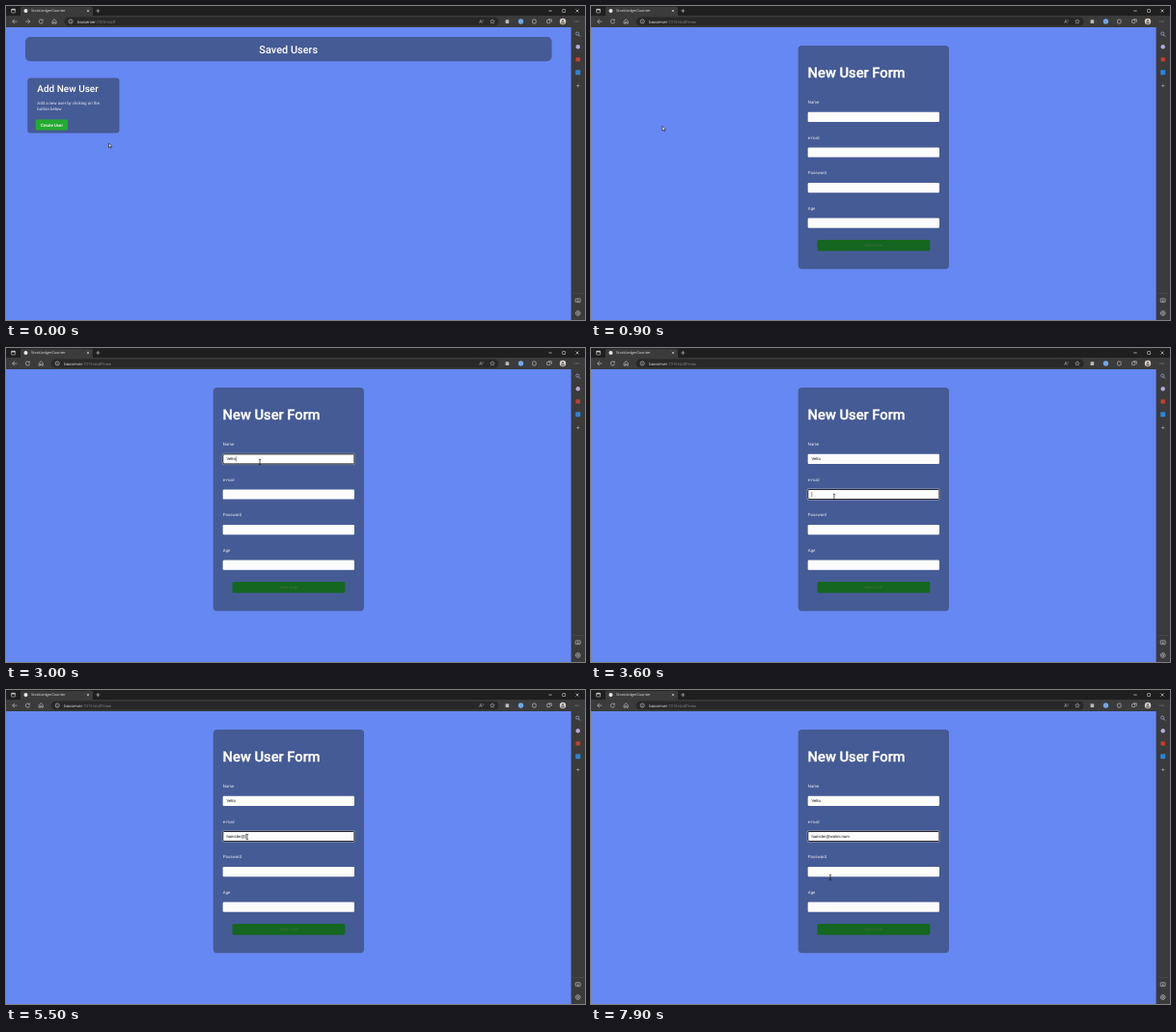
An HTML page with a canvas that plays this animation: 600x325 px, repeating every 8 s.

```html
<!DOCTYPE html>
<html lang="en">
<head>
<meta charset="utf-8">
<title>User form</title>
<style>
html, body { margin: 0; width: 100%; height: 100%; overflow: hidden; background: #6688f2; }
canvas { display: block; width: 600px; height: 325px; }
</style>
</head>
<body>
<canvas id="stage"></canvas>
<script>
const LOOP = 8000, STEP = 100;
const canvas = document.getElementById('stage');
const ctx = canvas.getContext('2d');
const dpr = window.devicePixelRatio || 1;
canvas.width = 600 * dpr;
canvas.height = 325 * dpr;

const ROBOTO = 'Roboto, sans-serif';
const ARIAL = '"Liberation Sans", Arial, sans-serif';
const CHROME = '"Open Sans", sans-serif';
const BAR = '#3b3b3b', PAGE = '#6688f2', CARD = '#455b95', ICON = '#cfcfcf';

// time, x, y
const path = [
  [0, 106.5, 142], [300, 62, 127], [500, 49, 123.5], [800, 49, 123.5], [900, 74, 124.5],
  [1200, 196, 122], [1500, 263, 118], [3200, 263, 118], [3600, 252, 154],
  [3700, 252, 154], [3900, 250, 152], [7500, 250, 152], [7900, 248, 194]
];
const NAME = 'Velto', MAIL = 'hamster@wolmi.nom';
const nameKeys = [2300, 2500, 2600, 2800, 2900];
const mailKeys = [3900, 4100, 4300, 4600, 4800, 5000, 5100, 5400, 5700,
  5800, 6000, 6100, 6300, 6600, 6700, 6800, 7000];
const labels = ['Name', 'e-mail', 'Password', 'Age'];
const fieldY = i => 109.8 + i * 36.6;

function typed(text, keys, t) {
  return text.slice(0, keys.filter(k => k <= t).length);
}

function pointerAt(t) {
  const i = path.findIndex(p => p[0] > t);
  if (i < 0) return path[path.length - 1].slice(1);
  const [t0, x0, y0] = path[i - 1], [t1, x1, y1] = path[i];
  const k = (t - t0) / (t1 - t0);
  return [x0 + (x1 - x0) * k, y0 + (y1 - y0) * k];
}

function rect(x, y, w, h, color) {
  ctx.fillStyle = color;
  ctx.fillRect(x, y, w, h);
}

function round(x, y, w, h, r, color) {
  ctx.beginPath();
  ctx.roundRect(x, y, w, h, r);
  ctx.fillStyle = color;
  ctx.fill();
}

function disc(x, y, r, color) {
  ctx.beginPath();
  ctx.arc(x, y, r, 0, 7);
  ctx.fillStyle = color;
  ctx.fill();
}

function ring(x, y, r, color = ICON, from = 0, to = 2 * Math.PI) {
  ctx.beginPath();
  ctx.arc(x, y, r, from, to);
  ctx.strokeStyle = color;
  ctx.lineWidth = 0.6;
  ctx.stroke();
}

function box(x, y, w, h, r = 0.5) {
  ctx.beginPath();
  ctx.roundRect(x, y, w, h, r);
  ctx.strokeStyle = ICON;
  ctx.lineWidth = 0.6;
  ctx.stroke();
}

function draw(d, x, y, color = ICON, width = 0.6) {
  ctx.save();
  ctx.translate(x, y);
  ctx.strokeStyle = color;
  ctx.lineWidth = width;
  ctx.stroke(new Path2D(d));
  ctx.restore();
}

function text(s, x, y, font, color, align = 'left') {
  ctx.font = font;
  ctx.textAlign = align;
  ctx.fillStyle = color;
  ctx.fillText(s, x, y);
  return ctx.measureText(s).width;
}

function tabStrip() {
  rect(0, 0, 600, 11, '#1f1f1f');
  round(15, 0.8, 75, 12, 1.5, BAR);
  box(5.6, 3.2, 4, 3.8);
  rect(5.6, 3.2, 4, 1.2, '#e0e0e0');
  disc(20.5, 5, 2, '#e8e8e8');
  text('StockLedgerCounter', 26, 6.4, '3.75px ' + CHROME, '#e6e6e6');
  draw('M-1.2-1.2L1.2 1.2M1.2-1.2L-1.2 1.2', 85, 5, '#dddddd');
  draw('M-2 0H2M0-2V2', 95.3, 5);
  draw('M-1.7 0H1.7', 564, 5, '#eeeeee');
  box(576.6, 3.5, 3, 3, 0.3);
  draw('M-1.5-1.5L1.5 1.5M1.5-1.5L-1.5 1.5', 592, 5, '#eeeeee');
}

function toolbar(form) {
  const shift = form ? -13.8 : 0;
  rect(0, 10, 600, 12, BAR);
  draw('M2.4 0H-2.3M0-2.2L-2.3 0L0 2.2', 9, 16);
  if (!form) draw('M-2.4 0H2.3M0-2.2L2.3 0L0 2.2', 22.5, 16);
  ring(36.3 + shift, 16, 2.1, ICON, 0.2, 5.3);
  draw('M1.9-2.4V-.9H.4', 36.3 + shift, 16);
  draw('M-2.1 2.2V-.4L0-2.3L2.1-.4V2.2H.7V.6H-.7V2.2Z', 50 + shift, 16);

  round(60.5 + shift, 11.6, 450 - shift, 8.9, 4.4, '#282828');
  ring(67 + shift, 16, 2.1);
  draw('M0-.3V1.2M0-1.2V-.8', 67 + shift, 16);
  const font = '4.1px ' + CHROME, x = 74 + shift;
  const w = text('boxserver', x, 17.5, font, '#f2f2f2');
  text(':7315/staff' + (form ? '/new' : ''), x + w, 17.5, font, '#8d8d8d');

  draw('M-2 1.8L-.6-1.8L.8 1.8M-1.5.6H.3M1.4-1.8Q2.4-.8 1.6.4', 492.5, 16, '#a8a8a8', 0.5);
  draw('M0-2.3L.7-.7L2.3-.6L1 .5L1.4 2.1L0 1.2L-1.4 2.1L-1 .5L-2.3-.6L-.7-.7Z', 504, 16, '#b5b5b5', 0.5);
  round(517.6, 14.3, 3.6, 3.6, 0.5, '#b9b9b9');
  disc(533.5, 16, 2.7, '#6fa8e8');
  box(545.6, 14, 3.6, 4, 1);
  box(560.6, 14.4, 3.2, 3.2);
  draw('M-.8-2.2H2.3V.8', 563, 16);
  disc(577, 16, 3.2, '#d5d0cb');
  disc(577, 15.2, 1.1, '#77706b');
  round(575.1, 16.6, 3.8, 1.8, 0.9, '#77706b');
  for (let i = -1; i < 2; i++) disc(591.5 + i * 1.6, 16, 0.4, '#dddddd');
}

function sidebar() {
  rect(585.6, 22, 14.4, 303, BAR);
  ring(592.2, 28.6, 1.6, '#a9bdea');
  draw('M0 0L1.7 1.7', 593.3, 29.8, '#a9bdea', 0.8);
  disc(592.7, 42.3, 2.2, '#b9a8dc');
  round(590.5, 53.2, 4.4, 4.4, 0.4, '#c4402f');
  round(590.2, 66.2, 5, 5, 0.6, '#2b86d9');
  draw('M-1.8 0H1.8M0-1.8V1.8', 592.7, 82.5, '#aaaaaa');
  rect(588, 297, 10, 0.4, '#5a5a5a');
  box(590.2, 302.8, 5, 3.8);
  draw('M0-1.2V1.2M-1.2 0L0 1.2L1.2 0', 592.7, 304.7, ICON, 0.5);
  ring(592.7, 318, 1);
  draw('M-1.3-2.2H1.3L2.6 0L1.3 2.2H-1.3L-2.6 0Z', 592.7, 318);
}

function usersPage(t, [px, py]) {
  round(20, 32, 545.6, 25.3, 5, CARD);
  text('Saved Users', 292.7, 48.6, '500 10.94px ' + ROBOTO, '#ffffff', 'center');

  const onCard = px > 22 && px < 117.5 && py < 131;
  const onButton = px > 30 && px < 64 && py > 117 && py < 128.5;
  ctx.save();
  if (onCard) {
    ctx.shadowColor = 'rgba(20,30,70,.75)';
    ctx.shadowBlur = 4 * dpr;
  }
  round(22.3, 74.6, 95.2, 56.8, 3, CARD);
  ctx.restore();
  text('Add New User', 32.3, 89.1, '500 10px ' + ROBOTO, '#ffffff');
  const body = '4.375px ' + ROBOTO;
  text('Add a new user by clicking on the', 32.3, 101.6, body, '#e4e8f3');
  text('button below', 32.3, 107.9, body, '#e4e8f3');

  const grow = onButton ? 0.5 : 0;
  round(30.8 - grow, 117.4 - grow, 33.2 + grow * 2, 11.2 + grow * 2, 1.3,
    t >= 800 ? '#1e9a2a' : '#25ab30');
  text('Create User', 47.4, 124.5, '500 4.4px ' + ROBOTO, '#ffffff', 'center');
}

function field(i, value, focused, caret) {
  const x = 224.7, y = fieldY(i), w = 136.3, h = 10.2;
  text(labels[i], 224.8, y - 8.8, '4.375px ' + ROBOTO, '#e8ebf4');
  round(x, y, w, h, 1.2, '#fcfcfc');
  if (focused) {
    ctx.lineWidth = 0.5;
    ctx.strokeStyle = 'rgba(240,240,240,.7)';
    ctx.beginPath();
    ctx.roundRect(x - 0.6, y - 0.6, w + 1.2, h + 1.2, 1.6);
    ctx.stroke();
    ctx.lineWidth = 0.9;
    ctx.strokeStyle = '#181818';
    ctx.beginPath();
    ctx.roundRect(x + 0.1, y + 0.1, w - 0.2, h - 0.2, 1.2);
    ctx.stroke();
  }
  const end = text(value, 228.5, y + 6.6, '4.17px ' + ARIAL, '#111111');
  if (caret) rect(228.7 + end, y + 2.6, 0.45, 5, '#111111');
}

function formPage(t) {
  round(214.7, 41, 156.3, 231.2, 4, CARD);
  ctx.strokeStyle = '#ffffff';
  ctx.lineWidth = 0.3;
  text('New User Form', 224.6, 74, '500 14.7px ' + ROBOTO, '#ffffff');
  ctx.strokeText('New User Form', 224.6, 74);

  const focus = t < 2100 ? -1 : t < 3600 ? 0 : 1;
  const values = [typed(NAME, nameKeys, t), typed(MAIL, mailKeys, t), '', ''];
  values.forEach((v, i) => field(i, v, i === focus, i === focus && t < 7600));

  round(234.5, 242, 116.8, 11.6, 1.5, '#146620');
  text('Save User', 292.8, 249.4, '4.375px ' + ROBOTO, '#46703f', 'center');
}

function pointer(kind, x, y) {
  ctx.save();
  ctx.translate(x, y);
  if (kind === 'beam') {
    draw('M-1.2-2.8Q0-2.8 0-2.1Q0-2.8 1.2-2.8M0-2.2V2.2M-1.2 2.8Q0 2.8 0 2.1Q0 2.8 1.2 2.8', 0, 0, '#111111', 0.65);
  } else {
    const shape = new Path2D(kind === 'hand'
      ? 'M-.5 0Q0-.6.5 0V1.7L2.3 2.1Q2.8 2.4 2.6 3.4L2.1 5H-.8L-2 3.1Q-1.8 2.4-.5 3.1Z'
      : 'M0 0V4.6L1.1 3.6L1.9 5.3L2.7 4.9L1.9 3.3H3.3Z');
    ctx.fillStyle = '#ffffff';
    ctx.strokeStyle = '#111111';
    ctx.lineWidth = 0.6;
    ctx.fill(shape);
    ctx.stroke(shape);
  }
  ctx.restore();
}

function pointerKind(form, [x, y]) {
  if (!form) return x < 64 && y > 117 && y < 128.5 ? 'hand' : 'arrow';
  const onField = x > 224 && x < 361 && labels.some((_, i) => y > fieldY(i) - 1 && y < fieldY(i) + 11.5);
  return onField ? 'beam' : 'arrow';
}

function render(now) {
  const t = Math.floor((now % LOOP) / STEP) * STEP;
  const form = t >= 900;
  const pos = pointerAt(t);
  ctx.setTransform(dpr, 0, 0, dpr, 0, 0);
  ctx.textRendering = 'geometricPrecision';
  rect(0, 0, 600, 325, PAGE);
  tabStrip();
  toolbar(form);
  sidebar();
  if (form) formPage(t);
  else usersPage(t, pos);
  pointer(pointerKind(form, pos), ...pos);
}

const start = performance.now();
function tick() {
  render(performance.now() - start);
  requestAnimationFrame(tick);
}
tick();
</script>
</body>
</html>
```
